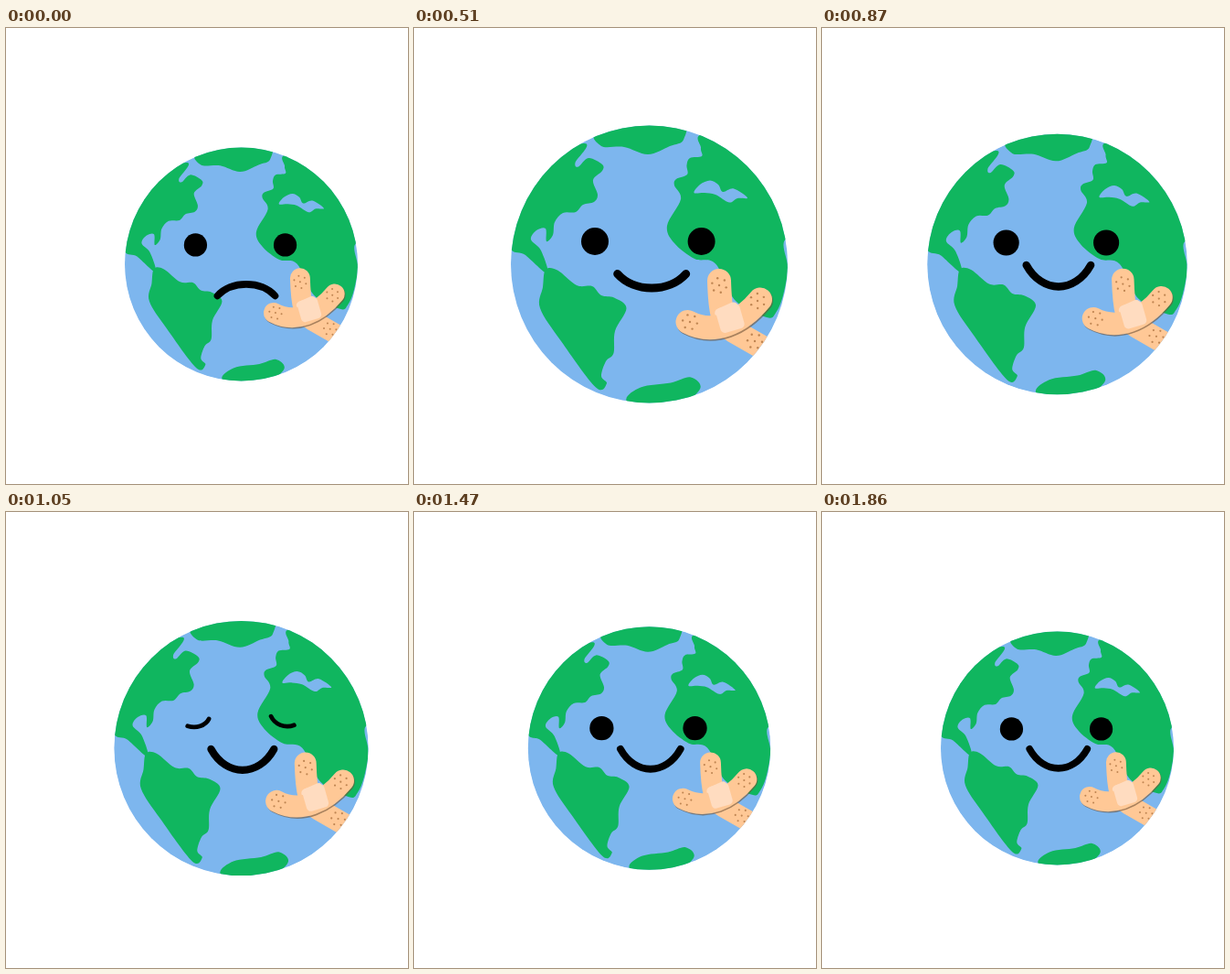
An HTML page for the animation above (1890 ms loop, 440 by 498 pixels).

```html
<!DOCTYPE html>
<html lang="en">
<head>
<meta charset="utf-8">
<title>Healing globe</title>
<style>
html, body { margin: 0; width: 100%; height: 100%; overflow: hidden; background: #fff; }
svg { display: block; width: 440px; height: 498px; }
.land { fill: #10b65f; }
.sea { fill: #7db6ee; }
.strip, .shade { fill: none; stroke: #ffc896; stroke-width: 26; stroke-linecap: round; }
.shade { stroke: #6f5238; stroke-opacity: .6; }
.pad { fill: #ffdcc0; }
.dot { fill: #bf8552; }
.mouth, .lids { fill: none; stroke: #000; stroke-width: 9; stroke-linecap: round; }
.lids { stroke-width: 5.2; }
</style>
</head>
<body>
<svg viewBox="0 0 440 498">
  <defs><clipPath id="disc"><circle cx="257.5" cy="258" r="151.5"/></clipPath></defs>
  <g id="globe">
    <g id="map" clip-path="url(#disc)">
      <circle class="sea" cx="257.5" cy="258" r="152"/>
    </g>
    <g id="eyes">
      <circle cx="198" cy="233" r="15"/>
      <circle cx="314.6" cy="233" r="15"/>
    </g>
    <path id="lids" class="lids" d="M193.5 231.5C204 235 215 231 219 223M293 220C297 229 309 235 320.5 230.5"/>
    <path id="mouth" class="mouth"/>
  </g>
</svg>
<script>
const LOOP = 1890, STEP = 30, PEAK = 510;
const SMALL = 127.5, FULL = 151.5, CX = 257.5, CY = 258;
const $ = id => document.getElementById(id);

function add(tag, cls, attrs) {
  const el = document.createElementNS('http://www.w3.org/2000/svg', tag);
  el.setAttribute('class', cls);
  for (const k in attrs) el.setAttribute(k, attrs[k]);
  $('map').appendChild(el);
}

// Closed smooth curve through a few key points
function blob(cls, text) {
  const p = text.split(' ').map(s => s.split(',').map(Number));
  const n = p.length, at = i => p[(i + n) % n];
  let d = `M${p[0]}`;
  for (let i = 0; i < n; i++) {
    const [a, b, c, e] = [-1, 0, 1, 2].map(k => at(i + k));
    const c1 = b.map((v, k) => v + (c[k] - a[k]) / 6);
    const c2 = c.map((v, k) => v - (e[k] - b[k]) / 6);
    d += `C${c1} ${c2} ${c}`;
  }
  add('path', cls, { d: d + 'Z' });
}

// Americas
blob('land', '186,126 176.5,147 180,151.5 191,142 206,149 206,156 196,166 201,182 197,190 185,193 ' +
  '177,201 163,202 154,212 152,226 145,233 144,219 134,221 128,231 139,243 146,268 122,248 104,234 110,150');
blob('land', '144,264 157,264.5 178,281 195,282 205,292 219,294.5 232.5,306 220,331 218.5,355 ' +
  '210,364 205,380 211,388 199,392.5 161,342 138,306 141,283');
// Poles
blob('land', '203,112 205,129 230,130 256,138 280,129 295,122 290,100');
blob('land', '233,408 248,392.5 281,387.5 303,381.5 312,396 270,425');
// Europe and Africa
blob('land', '319,116 314,131 315,140 302,142 298.5,150 299,160 287,165 285,172 292,187 277,216 ' +
  '285,235 307,252 330,257.5 352,298 386,316 396,311 404,292 409,262 404.5,236 412,216 410,130');
blob('sea', '306.5,180 313,171 324,166.5 333,171 338,179 350,175.5 365,185.5 354,186 345,190.5 330,182 318,180');

// One dot ringed by six, at the end of a plaster
function dots(x, y, turn) {
  add('circle', 'dot', { cx: x, cy: y, r: 1.2 });
  for (let i = 0; i < 6; i++) {
    const a = turn + i * Math.PI / 3;
    add('circle', 'dot', { cx: x + 8 * Math.cos(a), cy: y + 8 * Math.sin(a), r: 1.2 });
  }
}

const pad = (y, turn) =>
  add('rect', 'pad', { x: 332.5, y, width: 27, height: 28, rx: 5, transform: `rotate(${turn} 346 317)` });

// Crossed plasters
const front = 'M299.5 321C328 336 358 322 379 296.5';
add('path', 'strip', { d: 'M334 276C335 310 338 324 350 331L392 355' });
pad(302, -24);
add('path', 'shade', { d: front, transform: 'translate(1 1.5)' });
add('path', 'strip', { d: front });
pad(303, -16);
dots(334, 281, 0.3);
dots(302, 321, 0.2);
dots(376, 298, 0.5);
dots(373, 342, 0.1);

// Swells evenly, then shrinks ever more slowly
function radius(t) {
  const swell = t < PEAK ? t / PEAK : 1 - ((t - PEAK) / (LOOP - STEP - PEAK)) ** 0.72;
  return SMALL + (FULL - SMALL) * Math.max(0, swell);
}

// Mouth corners rise from frown to smile while the middle stays put
const moods = [[0, 299], [120, 285], [390, 268.5], [630, 259]];

function mouthPath(t) {
  const end = moods.filter(m => m[0] <= t).pop()[1];
  const x = 259 + (end - 259) / 8, bend = end + (284 - end) * 4 / 3;
  return `M${x - 37.5} ${end}C${x - 19} ${bend} ${x + 19} ${bend} ${x + 37.5} ${end}`;
}

const start = performance.now();

function draw(now) {
  const t = Math.floor(Math.max(0, now - start) % LOOP / STEP) * STEP;
  const closed = t >= 930 && t < 1200;
  $('globe').setAttribute('transform',
    `translate(${CX} ${CY}) scale(${radius(t) / FULL}) translate(${-CX} ${-CY})`);
  $('mouth').setAttribute('d', mouthPath(t));
  $('eyes').style.display = closed ? 'none' : '';
  $('lids').style.display = closed ? '' : 'none';
  requestAnimationFrame(draw);
}
draw(start);
</script>
</body>
</html>
```
